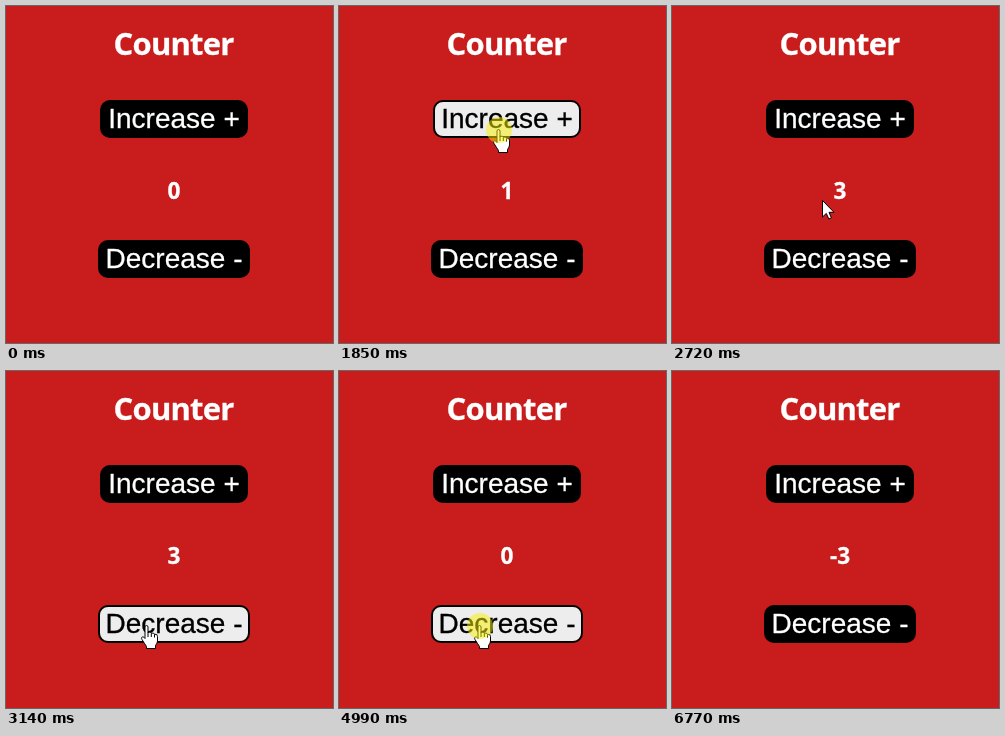
Animation of 327 by 337 pixels, one loop 7170 ms. Source, as an HTML page:

```html
<!DOCTYPE html>
<html lang="en">
<head>
<meta charset="utf-8">
<title>Counter</title>
<style>
  html, body { margin: 0; width: 100%; height: 100%; overflow: hidden; background: #c91c1c; }
  svg { display: block; }
  text { text-anchor: middle; color: #fff; fill: currentColor; stroke: currentColor; stroke-width: .3; }
  .title { font: 700 31px "Open Sans", "Noto Sans", sans-serif; letter-spacing: -.8px; }
  .count { font: 700 22.6px "Open Sans", "Noto Sans", sans-serif; }
  .button text { font: 28px "Liberation Sans", Arial, sans-serif; }
  .button rect { fill: #000; stroke: #000; stroke-width: 2; }
  .button.hover rect { fill: #ededed; }
  .button.hover text { color: #000; }
  .pointer path { fill: #fff; stroke: #000; stroke-linejoin: round; }
</style>
</head>
<body>
<svg width="327" height="337" viewBox="0 0 327 337">
  <text class="title" x="167.6" y="49">Counter</text>
  <g class="button" id="increase">
    <rect x="95" y="95" width="146" height="36" rx="9"/>
    <text x="168" y="122">Increase +</text>
  </g>
  <text class="count" id="count" x="168" y="193">0</text>
  <g class="button" id="decrease">
    <rect x="93" y="235" width="150" height="36" rx="9"/>
    <text x="168" y="262">Decrease -</text>
  </g>
  <g class="pointer" id="pointer">
    <path id="arrow" d="M.5 .5V17L4.3 13.4 6.8 19 9.4 17.9 7 12.3H12Z"/>
    <g id="hand">
      <path d="M-2 2Q-2 .5-.5 .5T1 2V7.5Q3.8 6.2 4.3 8.3 6.8 7.2 7.5 9.3 10.5 8.5 10.5 11.5V16Q10.5 18 8.5 20.5V23.5H-.5V21.5Q-2.5 18.5-5 14.5C-6.3 12-4 10.5-2 13.5Z"/>
      <path d="M1 7V12M4.3 8.3V12M7.5 9.3V12.5" fill="none"/>
    </g>
  </g>
  <circle id="glow" r="13" fill="#f8f000" opacity=".5"/>
</svg>
<script>
const LOOP = 7170;
const HOLD = 120;
const $ = id => document.getElementById(id);

const easeIn = (u, power) => u ** power;
const easeOut = (u, power) => 1 - (1 - u) ** power;

// The pointer enters, crosses to the lower button, then leaves.
const moves = [
  { start: 510, end: 990, steps: 7, from: [316, 144], to: [160, 123], ease: easeOut, power: [2.2, 1.2] },
  { start: 2580, end: 3140, steps: 8, from: [160, 123], to: [141, 254], ease: easeOut, power: [2.7, 2.7] },
  { start: 6375, end: 6770, steps: 6, from: [141, 254], to: [372, 351], ease: easeIn, power: [2, 2] }
];

const presses = {
  increase: [1320, 1850, 2370],
  decrease: [3400, 3930, 4390, 4920, 5450, 5910]
};
const allPresses = [...presses.increase, ...presses.decrease];

function pointerAt(t) {
  const move = moves.findLast(m => t >= m.start);
  if (!move) return [400, 400];
  const { start, end, steps, from, to, ease, power } = move;
  const progress = Math.min(1, (t - start) / (end - start));
  const u = Math.floor(progress * steps + 1e-6) / steps;
  return from.map((a, i) => Math.round(a + (to[i] - a) * ease(u, power[i])));
}

const released = (times, t) => times.filter(press => t >= press + HOLD).length;
const show = (el, on) => el.setAttribute("visibility", on ? "visible" : "hidden");

function hover(id, x, y) {
  const box = $(id).getBBox();
  const dx = Math.abs(x - box.x - box.width / 2);
  const dy = Math.abs(y - box.y - box.height / 2);
  const over = dx < box.width / 2 + 1 && dy < box.height / 2 + 1;
  $(id).classList.toggle("hover", over);
  return over;
}

function draw(t) {
  const [x, y] = pointerAt(t);
  const over = ["increase", "decrease"].filter(id => hover(id, x, y)).length > 0;
  $("pointer").setAttribute("transform", `translate(${x} ${y})`);
  show($("hand"), over);
  show($("arrow"), !over);

  show($("glow"), allPresses.some(press => t >= press && t < press + HOLD));
  $("glow").setAttribute("cx", x);
  $("glow").setAttribute("cy", y + 1);

  $("count").textContent = released(presses.increase, t) - released(presses.decrease, t);
}

const start = performance.now();
function tick() {
  draw((performance.now() - start) % LOOP);
  requestAnimationFrame(tick);
}
tick();
</script>
</body>
</html>
```
